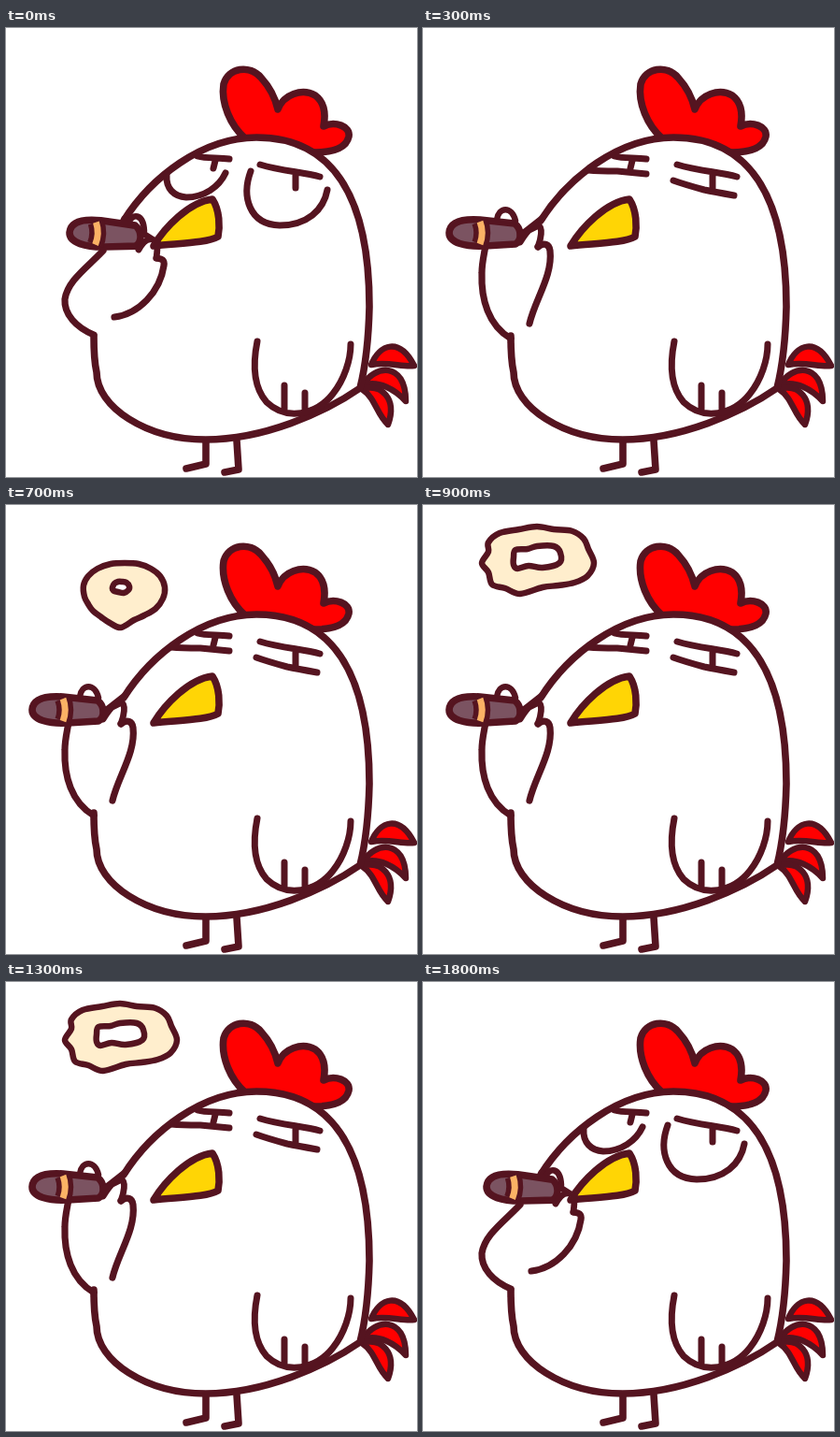
Write an HTML page that moves like this. It is 440 by 480 pixels and loops after 2.8 s.

```html
<!DOCTYPE html>
<html lang="en">
<head>
<meta charset="utf-8">
<title>Smoking hen</title>
<style>
  html, body { margin: 0; width: 100%; height: 100%; overflow: hidden; background: #fff; }
  svg { display: block; width: 100%; height: 100%; }
  .ink { fill: none; stroke: #551420; stroke-width: 7.6; stroke-linecap: round; stroke-linejoin: round; }
  .red { fill: #ff0000; }
  .white { fill: #fff; }
</style>
</head>
<body>
<svg viewBox="0 0 440 480" class="ink">
  <g class="red">
    <path d="M256 118C240 104 230 80 233 60C238 42 261 39 273 53C284 65 289 78 291 87C297 71 317 64 331 72C342 80 342 94 340 105C352 99 369 105 367 116C364 130 346 133 330 133Z"/>
    <g stroke-width="6.5">
      <path d="M391 360C400 338 421 330 437 361C425 363 408 356 391 360Z"/>
      <path d="M382 382C394 360 428 356 428 399C417 387 399 376 382 382Z"/>
      <path d="M381 386C402 380 419 396 409 424C396 412 396 396 381 386Z"/>
    </g>
  </g>
  <path d="M214 443V466L193 471M247 441L249 472L234 475"/>
  <path class="white" d="M126 206C155 160 210 117 268 117C356 117 389 190 389 298C388 340 384 365 379 385C340 412 275 440 214 440C150 440 97 405 97 368C94 355 94 340 94 329"/>
  <path d="M269 335C264 360 265 384 279 400C300 420 332 414 350 391C362 376 369 355 369 338M298 382V408M320 390V408" stroke-width="7"/>
  <path d="M205 137C215 140 228 138 239 140M224 142L222 150M272 146C295 153 318 154 336 159M310 156V171" stroke-width="7"/>
  <path fill="#ffd505" d="M158 233C170 213 196 186 221 183C229 195 229 213 227 223C215 230 185 230 158 233Z"/>
  <path id="lids" stroke-width="7"/>
  <path id="arm" stroke-width="7.2"/>
  <path id="loop" class="white" stroke-width="6.5"/>
  <g id="cigar">
    <path id="leaf" fill="#7b5361" d="M-38 0C-37 -14 -20 -15 -5 -14L32 -10C40 -4 40 8 33 12L0 14C-20 15 -38 11 -38 0Z"/>
    <g id="band">
      <path d="M0 -12C3 -4 3 4 0 12" stroke-width="18" stroke-linecap="butt"/>
      <path d="M0 -12C3 -4 3 4 0 12" stroke="#fbb265" stroke-width="7" stroke-linecap="butt"/>
    </g>
  </g>
  <path id="hand" stroke-width="6.8"/>
  <g id="smoke" stroke-width="6.5">
    <path id="puff" fill="#ffeecd"/>
    <path id="hole" class="white"/>
  </g>
</svg>
<script>
const $ = id => document.getElementById(id);
const STEP = 100, LOOP = 2800;

// Key poses: cigar in beak, halfway, held away. cigar = [x, y, tilt, band x]
const poses = [
  {
    lids: "M172 157C171 172 180 180 193 181C212 181 228 170 235 155M262 153C252 180 260 210 293 211C322 211 340 195 344 173",
    arm: "M94 328C75 320 62 306 63 290C66 270 87 256 104 238M116 309C142 306 165 282 169 254C170 247 166 247 161 246M127 204L127 212",
    loop: "M130 210C135 197 147 198 148 217",
    hand: "M142 237C146 230 151 225 156 226C164 227 162 236 161 246M146 219L157 226",
    cigar: [106, 220, 2, -10]
  },
  {
    lids: "M183 152C191 155 201 157 211 157C220 157 230 158 239 158M265 164C276 168 288 171 300 174C312 177 324 179 336 181",
    arm: "M94 330C70 320 60 296 63 275C65 258 73 246 79 236M114 303C136 290 152 260 146 238C144 230 140 228 133 229M127 204L114 216",
    loop: "M92 204C97 191 107 190 112 207",
    hand: "M110 226C112 215 116 207 121 207C127 207 129 220 133 229M110 212L121 208",
    cigar: [74, 220, -5, -9]
  },
  {
    lids: "M177 152C187 153 198 153 208 153C218 154 228 155 239 156M268 163C279 167 290 170 301 173C311 175 322 177 333 179",
    arm: "M94 332C70 318 62 290 63 262C63 250 66 240 67 232M114 316C120 290 139 265 136 238C135 231 130 229 123 234M127 204L104 222",
    loop: "M79 205C81 191 95 190 99 206",
    hand: "M104 229C110 219 116 211 123 211C129 213 126 226 123 234M104 221L122 212",
    cigar: [66, 219, 0, -5]
  }
];

const small = {
  puff: [84,98, 83,86, 88,76, 98,68, 112,63, 127,62, 142,63, 155,68, 165,76, 170,88, 168,100, 160,111, 148,118, 137,123, 123,131, 111,126, 102,120, 93,113, 88,106],
  hole: [114,88, 116,84, 120,82, 124,82, 129,83, 132,87, 131,91, 126,94, 120,93, 116,92, 114,90]
};
const wide = {
  puff: [63,62, 70,50, 70,40, 82,30, 103,26, 122,23, 140,26, 160,28, 172,36, 177,47, 183,62, 176,76, 162,83, 145,86, 128,88, 104,95, 88,89, 74,85, 70,72],
  hole: [97,56, 99,48, 112,47, 122,44, 140,44, 147,51, 146,62, 128,67, 113,65, 101,68, 97,64]
};

const mix = (a, b, k) => a + (b - a) * k;
const mixList = (a, b, k) => a.map((v, i) => mix(v, b[i], k));
const clamp = (v, lo, hi) => Math.min(hi, Math.max(lo, v));

function mixPath(a, b, k) {
  const ends = b.match(/\d+/g);
  let i = 0;
  return a.replace(/\d+/g, n => mix(+n, +ends[i++], k).toFixed(2));
}

// Closed smooth curve through a flat list of points
function smooth(list) {
  const n = list.length / 2;
  const at = i => { const j = (i + n) % n * 2; return [list[j], list[j + 1]]; };
  let d = "M" + at(0);
  for (let i = 0; i < n; i++) {
    const [p, q, r, s] = [at(i - 1), at(i), at(i + 1), at(i + 2)];
    const c1 = q.map((v, j) => v + (r[j] - p[j]) / 6);
    const c2 = r.map((v, j) => v - (s[j] - q[j]) / 6);
    d += "C" + [c1, c2, r].join(" ");
  }
  return d + "Z";
}

function drawPose(reach) {
  const i = Math.min(1, Math.floor(reach)), k = reach - i;
  const a = poses[i], b = poses[i + 1];
  for (const id of ["lids", "arm", "loop", "hand"]) $(id).setAttribute("d", mixPath(a[id], b[id], k));
  const [x, y, tilt, band] = mixList(a.cigar, b.cigar, k);
  $("cigar").setAttribute("transform", `translate(${x} ${y}) rotate(${tilt})`);
  $("band").setAttribute("transform", `translate(${band} 0)`);
}

// Early puffs: [centre x, centre y, scale x, scale y]
const rising = [[150, 196, .25, .3], [140, 162, .5, .6], [130, 123, .76, 1.04]];

function drawSmoke(step) {
  const shown = step >= 4 && step < 15;
  $("smoke").style.display = shown ? "" : "none";
  if (!shown) return;
  const grow = clamp((step - 7) / 2, 0, 1);
  let puff = mixList(small.puff, wide.puff, grow);
  if (step < 7) {
    const [x, y, sx, sy] = rising[step - 4];
    puff = puff.map((v, i) => i % 2 ? y + (v - 96) * sy : x + (v - 126) * sx);
  }
  $("puff").setAttribute("d", smooth(puff));
  $("hole").setAttribute("d", smooth(mixList(small.hole, wide.hole, grow)));
  $("hole").style.display = step < 7 ? "none" : "";
}

function draw(ms) {
  const step = Math.min(18, Math.floor(ms % LOOP / STEP));
  const away = [0, .5, 1, 2];
  drawPose(away[clamp(Math.min(step, 18 - step), 0, 3)]);
  drawSmoke(step);
}

const start = performance.now();
function tick() {
  draw(performance.now() - start);
  requestAnimationFrame(tick);
}
tick();
</script>
</body>
</html>
```
